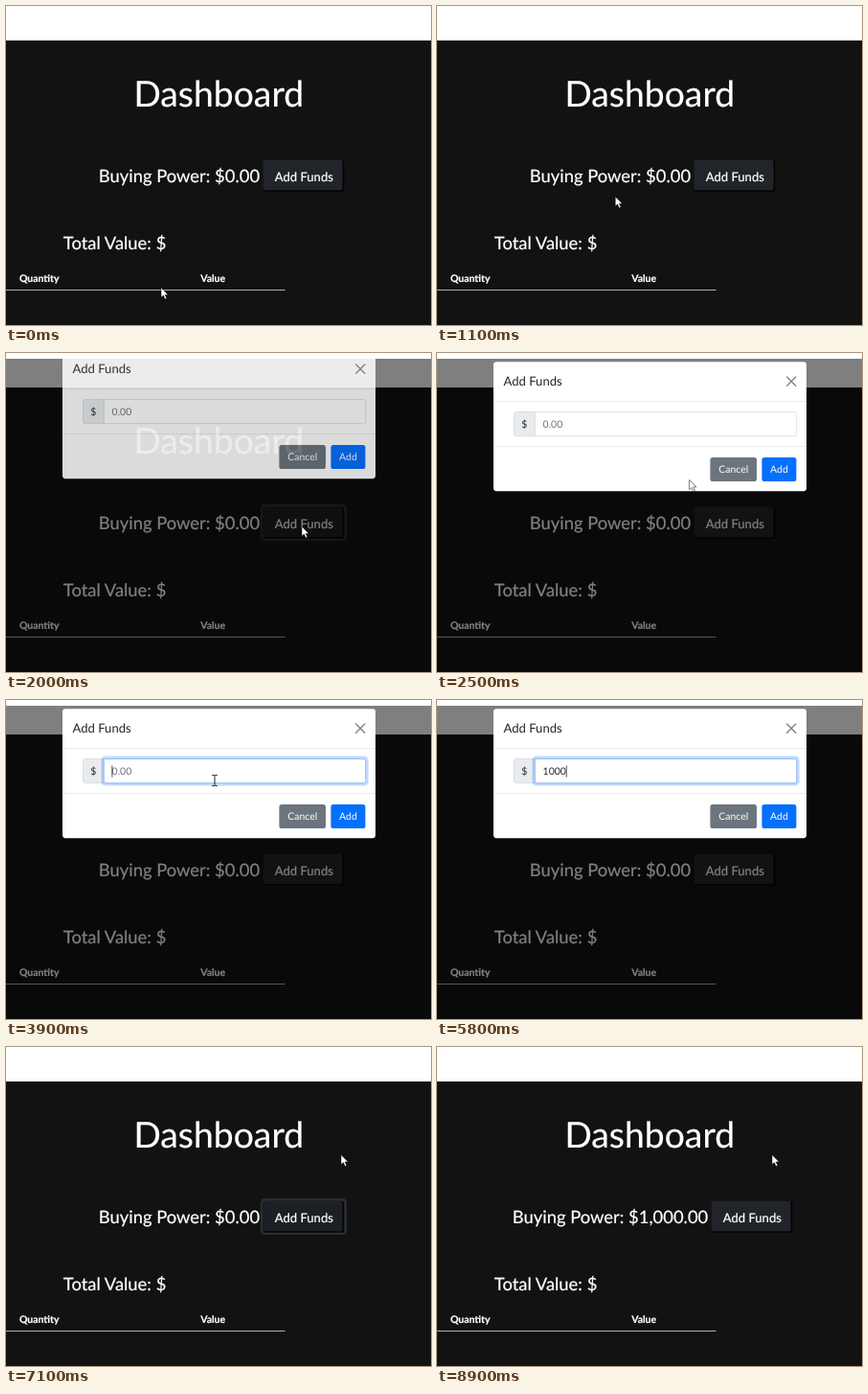
Recreate the animation shown at these times as an HTML page. Size 444x333 px, loop 9500 ms.

```html
<!DOCTYPE html>
<html lang="en">
<head>
<meta charset="utf-8">
<title>Dashboard</title>
<style>
html, body { margin: 0; width: 100%; height: 100%; overflow: hidden; background: #121212; }
svg { display: block; width: 444px; height: 333px; font-family: Lato, sans-serif; text-rendering: geometricPrecision; }
.page { fill: #fff; }
.page text { stroke: #fff; stroke-width: .22px; }
.h { font-size: 18.4px; }
.b { font-size: 10.46px; }
.t { font-size: 13.08px; }
.mid { text-anchor: middle; }
.bold { font-weight: 700; }
.ink { fill: #212529; }
</style>
</head>
<body>
<svg viewBox="0 0 444 333">
  <defs><clipPath id="view"><rect y="6" width="444" height="327"/></clipPath></defs>
  <rect width="444" height="333" fill="#121212"/>
  <rect width="444" height="36" fill="#fff"/>
  <g class="page">
    <text class="mid" x="222.3" y="105" font-size="37.3">Dashboard</text>
    <text class="h" id="power" y="183.9"></text>
    <g id="fund">
      <rect id="fundRing" x="266" y="158" width="90" height="38" rx="4.5" fill="#424649" fill-opacity=".55"/>
      <rect x="268.5" y="160.8" width="84.8" height="33" rx="2" fill="#040405"/>
      <rect id="fundFace" x="268.5" y="160.8" width="83" height="31.4" rx="1.6"/>
      <text class="t mid" x="311.3" y="182.8">Add Funds</text>
    </g>
    <text class="h" x="59.8" y="254.2">Total Value: $</text>
    <g class="b bold">
      <text x="13.9" y="287.5">Quantity</text>
      <text x="203.2" y="287.5">Value</text>
    </g>
    <rect y="296" width="291.5" height="1" fill="#b0b0b0"/>
  </g>
  <g clip-path="url(#view)">
    <rect id="shade" y="6" width="444" height="327"/>
    <g id="modal">
      <rect x="59" y="9.2" width="327" height="135" rx="3.1" fill="#fff"/>
      <path d="M59 50.6H386M59 97.6H386" stroke="#dee2e6" stroke-width=".7"/>
      <text class="t ink" x="69.5" y="34.4">Add Funds</text>
      <path d="M365.6 25l9.2 9.2m0-9.2l-9.2 9.2" stroke="#000" stroke-opacity=".5" stroke-width="1.3" stroke-linecap="round"/>
      <path d="M102.3 61.5H82.9a2.4 2.4 0 0 0-2.4 2.4V84.3a2.4 2.4 0 0 0 2.4 2.4H102.3z" fill="#e9ecef" stroke="#ced4da" stroke-width=".7"/>
      <text class="b ink mid" x="91.3" y="77.9">$</text>
      <path d="M102.3 61.5H373.3a2.4 2.4 0 0 1 2.4 2.4V84.3a2.4 2.4 0 0 1-2.4 2.4H102.3z" fill="#fff" stroke="#ced4da" stroke-width=".7"/>
      <g id="fieldRing" fill="none">
        <rect x="100.7" y="59.9" width="276.6" height="28.4" rx="3" stroke="#0d6efd" stroke-opacity=".25" stroke-width="2.6"/>
        <rect x="102.3" y="61.5" width="273.4" height="25.2" rx="1.6" stroke="#86b7fe" stroke-width=".8"/>
      </g>
      <text class="b" id="value" x="110.6" y="77.9"></text>
      <rect id="caret" y="68.4" width=".8" height="12.2" class="ink"/>
      <rect x="285.4" y="109" width="48.6" height="25" rx="2.6" fill="#6c757d"/>
      <rect id="addRing" x="336.8" y="106.4" width="41.2" height="30.2" rx="5" fill="#3184fd" fill-opacity=".5"/>
      <rect id="addFace" x="339.4" y="109" width="36" height="25" rx="2.6"/>
      <g class="b mid" fill="#fff">
        <text x="309.7" y="125.3">Cancel</text>
        <text x="357.4" y="125.3">Add</text>
      </g>
    </g>
  </g>
  <path id="arrow" d="M0 0V10.2L2.4 8.1L4.1 12L5.9 11.2L4.2 7.4H7.4z" fill="#fff" stroke="#000" stroke-width=".5"/>
  <path id="beam" d="M-2.8-5.6H-.6L0-5L.6-5.6H2.8M0-5V5M-2.8 5.6H-.6L0 5L.6 5.6H2.8" fill="none" stroke="#222"/>
  <g id="hand" stroke="#000">
    <path d="M-1.1 .9Q-1.1 0 0 0T1.1 .9V4.6Q2.7 4 3.2 5.2Q4.7 4.6 5.2 5.9Q6.9 5.5 6.9 7.2V9.6Q6.9 11.4 5.8 13.4H-.4L-3.5 9Q-4.4 7.6-3.3 7T-1.1 8.2z" fill="#fff" stroke-width=".8"/>
    <path d="M1.3 9V11.4M3.2 9V11.4M5 9V11.4" stroke-width=".5"/>
  </g>
</svg>
<script>
const LOOP = 9500, STEP = 100, SLIDE = 32.7, FADE = 150, BLINK = 530;
const el = {};
document.querySelectorAll('svg [id]').forEach(n => el[n.id] = n);

const ramp = (t, start, length = FADE) => Math.min(1, Math.max(0, (t - start) / length));
const within = (t, a, b) => t >= a && t < b;
const set = (node, name, v) => node.setAttribute(name, v);
const fade = (node, v) => set(node, 'opacity', v);

// cubic-bezier(0, 0, .58, 1)
function easeOut(p) {
  let lo = 0, hi = 1;
  for (let i = 0; i < 24; i++) {
    const s = (lo + hi) / 2;
    if (1.74 * (1 - s) * s * s + s ** 3 < p) lo = s; else hi = s;
  }
  return 3 * (1 - lo) * lo * lo + lo ** 3;
}

// Pointer stops: time, x, y
const stops = [[0, 162, 294], [1000, 172, 201], [1500, 309, 181], [2200, 309, 181],
  [2800, 218, 84], [5800, 218, 84], [6600, 350, 112.5], [LOOP, 350, 112.5]];

function pointer(t) {
  const i = stops.findIndex(s => s[0] > t);
  const [t0, x0, y0] = stops[i - 1], [t1, x1, y1] = stops[i];
  const p = (t - t0) / (t1 - t0), k = p * p * (3 - 2 * p);
  return [x0 + (x1 - x0) * k, y0 + (y1 - y0) * k];
}

// Field contents, from focus to submit
const edits = [[2760, ''], [4800, '1'], [5000, '10'], [5200, '100'], [5300, '1000'], [6700, '[object Object]']];

function drawField(t) {
  const [since, text] = edits.filter(e => e[0] <= t).pop() || edits[0];
  el.value.textContent = text || '0.00';
  set(el.value, 'fill', text ? '#212529' : '#6c757d');
  fade(el.fieldRing, ramp(t, 2750) - ramp(t, 6690));
  const lit = Math.floor((t - since) / BLINK) % 2 === 0;
  fade(el.caret, lit && within(t, 2800, 6700) ? 1 : 0);
  set(el.caret, 'x', 110.5 + text.length * 6.07);
}

function drawPointer(t) {
  const [x, y] = pointer(t);
  const open = within(t, 1800, 7000);
  const overFund = !open && x > 269 && x < 353 && y > 161 && y < 193;
  const overAdd = open && x > 339 && y > 109 && y < 134;
  const overField = within(t, 2200, 6700) && x > 102 && x < 376 && y > 61 && y < 87;
  const shape = overFund || overAdd ? 'hand' : overField ? 'beam' : 'arrow';
  for (const name of ['arrow', 'beam', 'hand']) {
    fade(el[name], name === shape && !within(t, 5100, 5900) ? 1 : 0);
    set(el[name], 'transform', `translate(${x} ${y})`);
  }
  set(el.fundFace, 'fill', overFund || within(t, 1700, 2300) || within(t, 7000, 7500) ? '#1c1f23' : '#212529');
  set(el.addFace, 'fill', overAdd ? '#0b5ed7' : '#0470fe');
}

function draw(t) {
  const paid = t >= 7500;
  el.power.textContent = 'Buying Power: $' + (paid ? '1,000.00' : '0.00');
  set(el.power, 'x', paid ? 78.8 : 96.8);
  set(el.fund, 'transform', `translate(${paid ? 18 : 0} 0)`);
  fade(el.fundRing, paid ? 0 : ramp(t, 1620) - ramp(t, 2150) + ramp(t, 6950));

  fade(el.shade, .5 * (ramp(t, 1715) - ramp(t, 6928)));
  fade(el.modal, ramp(t, 1872) - ramp(t, 6778));
  const drop = easeOut(ramp(t, 1872, 300)) - easeOut(ramp(t, 6778, 300));
  set(el.modal, 'transform', `translate(0 ${-SLIDE * (1 - drop)})`);
  fade(el.addRing, ramp(t, 6600));

  drawField(t);
  drawPointer(t);
}

const begin = performance.now();
function tick() {
  const t = (performance.now() - begin) % LOOP;
  draw(Math.floor(t / STEP) * STEP);
  requestAnimationFrame(tick);
}
tick();
</script>
</body>
</html>
```
